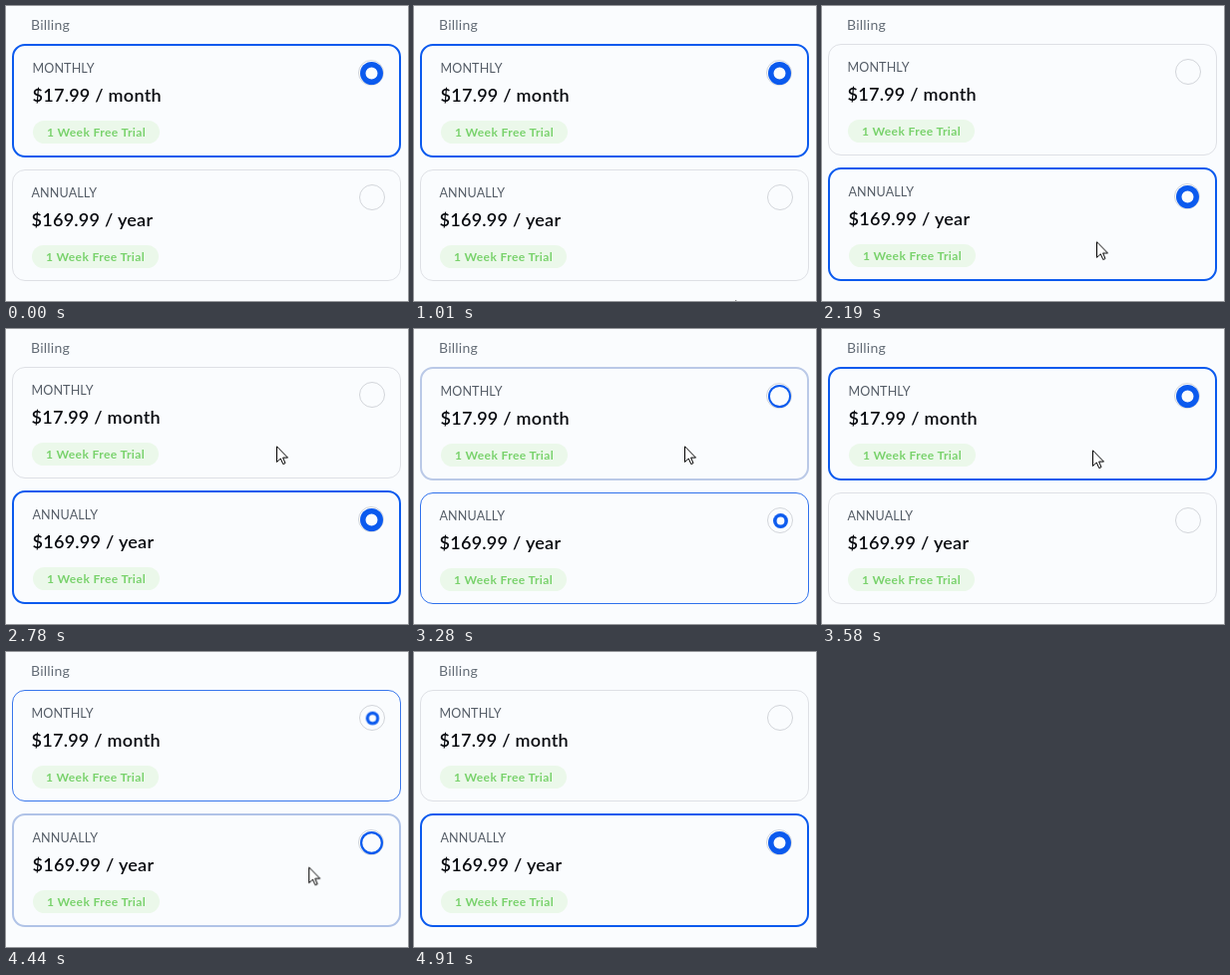
An HTML page that plays this animation: 403 px wide and 296 px high, repeating every 5780 ms.

```html
<!DOCTYPE html>
<html lang="en">
<head>
<meta charset="utf-8">
<title>Billing plans</title>
<style>
  :root { --blue: #0b5aee; --gray: #dee0e5; --loop: 5780ms infinite; }
  html, body { margin: 0; width: 100%; height: 100%; overflow: hidden; }
  body { position: relative; background: #fafcfe; font-family: Lato, "Open Sans", sans-serif; }
  h1, h2, p { position: absolute; margin: 0; line-height: 0; white-space: nowrap; }
  h1 { left: 25px; top: 18.6px; font-size: 14px; font-weight: 400; letter-spacing: .25px; color: #636c76; }

  .plans { position: absolute; left: 6px; top: 38px; width: 390px; display: flex; flex-direction: column; gap: 12px; }
  .card {
    position: relative; height: 110px; border: 1px solid; border-radius: 13px;
    animation: size var(--loop) step-end, tone var(--loop) ease-in;
  }
  .monthly { --monthly-width: 2px; --annual-width: 1px; --monthly-tone: var(--blue); --annual-tone: var(--gray); }
  .annual { --monthly-width: 1px; --annual-width: 2px; --monthly-tone: var(--gray); --annual-tone: var(--blue); }
  h2 { left: 18.5px; top: 23px; font-size: 12.5px; font-weight: 400; letter-spacing: .15px; color: #555d67; }
  .price { left: 18.5px; top: 49px; font-size: 18px; font-weight: 600; letter-spacing: .27px; color: #090b10; }
  .trial {
    left: 19px; top: 75px; width: 127px; height: 23px; border-radius: 12px;
    display: flex; align-items: center; justify-content: center;
    background: #ebf8ea; color: #79d26c; font-size: 12px; font-weight: 700; letter-spacing: .4px;
  }
  .radio {
    position: absolute; right: 15px; top: 14px; width: 24px; height: 24px;
    border: 1px solid #d2d5da; border-radius: 50%;
  }
  .radio::after {
    content: ""; position: absolute; inset: .5px; border-radius: 50%;
    --full: inset 0 0 0 5.5px var(--blue); --none: inset 0 0 0 0 var(--blue);
  }
  .monthly .radio::after { animation: monthly-ring var(--loop) linear; }
  .annual .radio::after { animation: annual-ring var(--loop) linear; }

  .track { position: absolute; left: 0; top: 0; animation: move var(--loop) ease-in-out; }
  .cursor { width: 14px; height: 21px; }
  .halo::after {
    content: ""; position: absolute; left: -16px; top: -15px;
    width: 30px; height: 30px; border-radius: 50%; background: #ffff80;
  }
  .halo { mix-blend-mode: multiply; animation: move var(--loop) ease-in-out, press var(--loop) step-end; }

  @keyframes size {
    0%, 55.4% { border-width: var(--monthly-width); }
    30.9%, 75.09%, 100% { border-width: var(--annual-width); }
  }
  @keyframes tone {
    0%, 30.9%, 59.3%, 75.09% { border-color: var(--monthly-tone); }
    35%, 55.4%, 79.4%, 100% { border-color: var(--annual-tone); }
  }
  /* A deselected ring shrinks away; a selected one thickens inward. */
  @keyframes monthly-ring {
    0%, 30.9%, 59.3%, 75.09% { transform: none; box-shadow: var(--full); }
    35%, 79.4%, 100% { transform: scale(0); box-shadow: var(--full); }
    35.01%, 55.4% { transform: none; box-shadow: var(--none); }
  }
  @keyframes annual-ring {
    0%, 30.9%, 59.31%, 75.09% { transform: none; box-shadow: var(--none); }
    35%, 55.4%, 79.4%, 100% { transform: none; box-shadow: var(--full); }
    59.3% { transform: scale(0); box-shadow: var(--full); }
  }
  @keyframes press {
    0%, 30.9%, 55.4%, 75.09%, 100% { opacity: 0; }
    29.41%, 53.97%, 72.14% { opacity: 1; }
  }
  @keyframes move {
    0%, 17.46%, 100% { transform: translate(326px, 300px); }
    17.47% { transform: translate(322px, 295px); animation-timing-function: ease-out; }
    25.09%, 37.6% { transform: translate(275px, 236px); }
    48.1%, 61.92% { transform: translate(271px, 117px); }
    61.93% { transform: translate(271px, 121px); }
    71.6% { transform: translate(296px, 204px); animation-timing-function: ease-out; }
    73.3%, 75.09% { transform: translate(299px, 210px); animation-timing-function: ease-in; }
    82% { transform: translate(344px, 265px); animation-timing-function: linear; }
    84.94% { transform: translate(366px, 300px); }
  }
</style>
</head>
<body>
  <h1>Billing</h1>
  <div class="plans">
    <section class="card monthly">
      <h2>MONTHLY</h2>
      <p class="price">$17.99 / month</p>
      <p class="trial">1 Week Free Trial</p>
      <span class="radio"></span>
    </section>
    <section class="card annual">
      <h2>ANNUALLY</h2>
      <p class="price">$169.99 / year</p>
      <p class="trial">1 Week Free Trial</p>
      <span class="radio"></span>
    </section>
  </div>
  <svg class="track cursor" viewBox="0 0 14 21">
    <path d="M.5 .8V16.5L4.3 13 6.8 18.6 9 17.6 6.6 12.1H11.5Z" fill="#fff" stroke="#000"/>
  </svg>
  <div class="track halo"></div>
</body>
</html>
```
